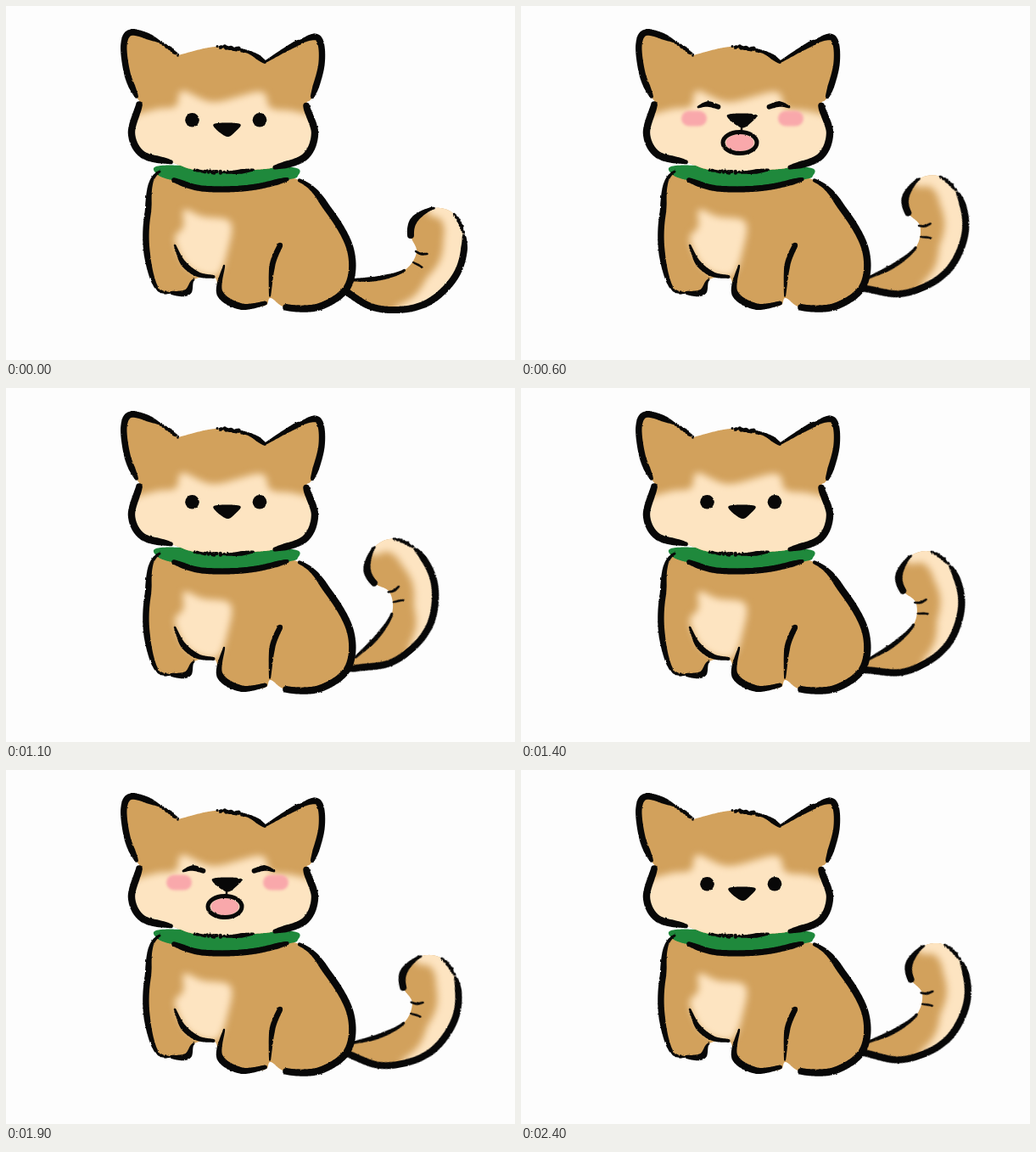
Write an HTML page that moves like this. It is 600 by 417 pixels and loops after 2.5 s.

```html
<!DOCTYPE html>
<html lang="en">
<head>
<meta charset="utf-8">
<title>Wagging dog</title>
<style>
  html, body { margin: 0; width: 100%; height: 100%; overflow: hidden; background: #fdfdfd; }
  svg { display: block; width: 100%; height: 100%; }
</style>
</head>
<body>
<svg id="stage" viewBox="0 0 600 417">
  <defs>
    <filter id="rough" filterUnits="userSpaceOnUse" x="0" y="0" width="600" height="417" color-interpolation-filters="sRGB">
      <feTurbulence type="fractalNoise" baseFrequency="0.3" numOctaves="2" seed="4"/>
      <feDisplacementMap in="SourceGraphic" scale="2" xChannelSelector="R" yChannelSelector="G"/>
    </filter>
    <filter id="soft" filterUnits="userSpaceOnUse" x="0" y="0" width="600" height="417" color-interpolation-filters="sRGB">
      <feGaussianBlur stdDeviation="4"/>
    </filter>
    <filter id="haze" filterUnits="userSpaceOnUse" x="0" y="0" width="600" height="417" color-interpolation-filters="sRGB">
      <feGaussianBlur stdDeviation="1.6"/>
    </filter>
  </defs>
</svg>
<script>
const NS = 'http://www.w3.org/2000/svg';
const stage = document.getElementById('stage');
const INK = '#080808', TAN = '#d2a15c', CREAM = '#fde4c1', GREEN = '#1f893c', PINK = '#f9a8ab';

let seed = 7;
const rand = () => (seed = seed * 16807 % 2147483647) / 2147483647;
const clamp = (v, lo, hi) => Math.max(lo, Math.min(hi, v));

function add(parent, tag, attrs = {}) {
  const el = document.createElementNS(NS, tag);
  for (const key in attrs) el.setAttribute(key, attrs[key]);
  return parent.appendChild(el);
}
const group = (parent, attrs) => add(parent, 'g', attrs);
const inked = parent => group(parent, { filter: 'url(#rough)' });
const ellipse = (parent, cx, cy, rx, ry, attrs) => add(parent, 'ellipse', { cx, cy, rx, ry, ...attrs });
const points = text => text.split(' ').map(p => p.split(',').map(Number));

// Catmull-Rom samples of a contour between two of its points
function sample(pts, from, to, closed) {
  const n = pts.length, out = [];
  const at = i => pts[closed ? (i + n) % n : clamp(i, 0, n - 1)];
  for (let i = from; i < to; i++) {
    const [a, b, c, d] = [at(i - 1), at(i), at(i + 1), at(i + 2)];
    const steps = Math.ceil(Math.hypot(c[0] - b[0], c[1] - b[1]) / 0.8);
    for (let s = 0; s < steps; s++) {
      const t = s / steps;
      out.push([0, 1].map(k => b[k] + 0.5 * t * (c[k] - a[k] +
        t * (2 * a[k] - 5 * b[k] + 4 * c[k] - d[k] + t * (3 * (b[k] - c[k]) + d[k] - a[k])))));
    }
  }
  return out;
}

const outline = pts =>
  'M' + sample(pts, 0, pts.length, true).map(p => p.map(v => v.toFixed(1)).join(' ')).join('L') + 'Z';
const shape = (parent, fill, text) => add(parent, 'path', { d: outline(points(text)), fill });

function disc(x, y, r) {
  const d = (2 * r).toFixed(2);
  return `M${(x - r).toFixed(2)} ${y.toFixed(2)}a${d / 2} ${d / 2} 0 1 0 ${d} 0a${d / 2} ${d / 2} 0 1 0 ${-d} 0`;
}

// Round stamps along a path; both ends taper over `reach` pixels, a dry brush scatters
function stamp(parent, path, width, { start = 0.6, end = 0.6, reach = 14, dry = false, fill = INK } = {}) {
  const last = path.length - 1, span = reach / 0.8;
  const d = path.map(([x, y], i) => {
    const grow = Math.min(1, start + (1 - start) * i / span, end + (1 - end) * (last - i) / span);
    const r = width * grow / 2;
    if (!dry) return disc(x, y, r);
    if (rand() < 0.3) return '';
    return disc(x + (rand() - 0.5) * r * 0.6, y + (rand() - 0.5) * r * 0.8, r * (0.5 + rand() * 0.35));
  }).join('');
  return add(parent, 'path', { d, fill });
}

function brush(parent, text, width, style) {
  const pts = points(text);
  return stamp(parent, sample(pts, 0, pts.length - 1, false), width, style);
}

// A tan contour with a clipped, blurred layer for its light markings and ink for its edge
function part(parent, id, text) {
  const pts = points(text), d = outline(pts);
  add(add(stage.querySelector('defs'), 'clipPath', { id }), 'path', { d });
  add(parent, 'path', { d, fill: TAN });
  const light = group(group(parent, { 'clip-path': `url(#${id})` }), { filter: 'url(#soft)' });
  const ink = inked(parent);
  const edge = (layer, from, to, width, style) => stamp(layer, sample(pts, from, to, true), width, style);
  return { light, ink, edge };
}

function drawTail() {
  const g = group(stage);
  const { light, ink, edge } = part(g, 'tailClip',
    '404,323 438,321 470,311 484,290 477,270 482,251 505,238 528,245 540,272 536,305 520,331 494,351 462,358 430,354 402,337 386,325');
  edge(light, 6, 12, 50, { start: 0.4, end: 0.2, reach: 60, fill: CREAM });
  edge(ink, 0, 2, 5.5, { start: 0.5, reach: 25 });
  edge(ink, 4, 6, 10, { start: 0.8, end: 0.3, reach: 35 });
  edge(ink, 7, 8, 6, { dry: true });
  edge(ink, 8, 15, 8);
  brush(ink, '483,289 489,292 497,292', 4);
  brush(ink, '480,302 486,305 491,308', 3.6);
  return g;
}

function drawBody() {
  const g = group(stage);
  const { light, ink, edge } = part(g, 'bodyClip',
    '181,195 167,245 166,290 177,331 196,338 214,337 222,322 246,320 252,339 277,354 305,353 312,344 330,355 370,354 403,330 406,287 380,240 345,205 262,190');
  shape(light, CREAM, '210,240 232,248 264,254 262,285 248,318 215,308 199,275 209,260');
  shape(g, GREEN, '182,188 179,199 204,207 258,216 330,205 344,200 338,190 262,190');
  g.append(ink);
  edge(ink, 0, 3, 7.5, { start: 0.4, reach: 40 });
  edge(ink, 3, 4, 5, { dry: true });
  edge(ink, 4, 6, 7.5, { end: 0.3 });
  edge(ink, 12, 17, 8.5, { start: 0.9, end: 0.5, reach: 40 });
  brush(ink, '199,282 209,303 226,316 245,319', 6.5, { start: 0.4, reach: 25 });
  brush(ink, '257,306 252,338 277,354 306,350', 8, { start: 0.3, reach: 35 });
  brush(ink, '323,282 314,305 311,342', 7, { start: 0.9, end: 0.3, reach: 35 });
  brush(ink, '198,205 225,214 258,216 295,213 332,204', 7, { start: 0.8 });
}

function drawHead() {
  const { light, ink, edge } = part(group(stage), 'headClip',
    '203,58 181,42 149,31 139,45 143,80 154,107 157,116 148,150 161,175 195,184 222,193 262,196 292,193 317,190 352,178 364,150 354,117 361,107 372,68 368,38 345,43 305,66 305,66 285,54 247,48 203,58');
  shape(light, CREAM,
    '145,136 175,122 200,118 208,100 245,113 300,101 312,120 340,124 368,136 372,178 317,198 262,202 194,194 140,180');
  edge(ink, 0, 1, 6, { dry: true });
  edge(ink, 1, 5, 7.5, { start: 0.4 });
  edge(ink, 6, 9, 8.5, { start: 0.9 });
  edge(ink, 10, 11, 6, { dry: true });
  edge(ink, 11, 12, 5.5);
  edge(ink, 13, 16, 8.5, { end: 0.9 });
  edge(ink, 17, 20, 7.5);
  edge(ink, 20, 21, 6.5, { start: 1, end: 0.4, reach: 40 });
  edge(ink, 22, 23, 6.5);
  edge(ink, 23, 24, 6.5, { dry: true });
}

function nose(parent, x, y, w, h) {
  const low = y + h * 0.6;
  shape(parent, INK,
    `${x - w},${y} ${x},${y - 2} ${x + w},${y} ${x + w * 0.6},${low} ${x + 1},${y + h} ${x - w * 0.6},${low}`);
}

function eyes(parent, mid, text, width, style) {
  brush(parent, text, width, style);
  brush(group(parent, { transform: `translate(${2 * mid}) scale(-1 1)` }), text, width, style);
}

function blush(parent, mid, y, rx, ry, opacity) {
  const tint = group(parent, { filter: 'url(#haze)', opacity });
  for (const x of [mid - 57, mid + 57])
    add(tint, 'rect', { x: x - rx, y: y - ry, width: 2 * rx, height: 2 * ry, rx: ry, fill: PINK });
}

function mouth(parent, ink, x, y, rx, ry) {
  ellipse(parent, x, y, rx - 3.5, ry - 2.5, { fill: PINK });
  ellipse(ink, x, y, rx, ry, { fill: 'none', stroke: INK, 'stroke-width': 5 });
  brush(ink, `${x + 2},${y - ry - 6} ${x + 2},${y - ry}`, 4);
}

function calmFace() {
  const g = group(stage), ink = inked(g);
  for (const x of [219.5, 299]) ellipse(ink, x, 134.3, 8.3, 8.3, { fill: INK });
  nose(ink, 260.5, 139.5, 16, 14.5);
  return g;
}

function halfFace(cheek, opacity) {
  const g = group(stage);
  blush(g, 257, 135, cheek, 5, opacity);
  const ink = inked(g);
  eyes(ink, 261, '213,122 222,120 230,122.5', 11, { start: 0.2, end: 0.9 });
  nose(ink, 261.5, 134, 17.5, 14);
  mouth(g, ink, 260.5, 161.5, 13, 8.5);
  g.append(ink);
  return g;
}

function wideFace() {
  const g = group(stage);
  blush(g, 261, 132.5, 15, 9, 1);
  const ink = inked(g);
  eyes(ink, 262.5, '209,119 220,115.5 233,119', 7, { start: 0.4, end: 0.8 });
  nose(ink, 260.5, 128.5, 17.5, 15);
  mouth(g, ink, 258, 161, 20, 12.5);
  g.append(ink);
  return g;
}

const tail = drawTail();
drawBody();
drawHead();
const faces = [calmFace(), halfFace(5, 0.45), halfFace(8, 0.6), wideFace()];

const STEP = 100, STEPS = 25, PEAK = 45;

// Four wags, the first a step longer; the low point sinks at the ends of the loop
function wag(step) {
  const phase = step < 7 ? step / 7 : (step - 7) % 6 / 6;
  const low = 16 * Math.sin(Math.PI * step / STEPS);
  return low + (PEAK - low) * Math.sin(Math.PI * phase) ** 1.3;
}

// Two yawns per loop, from calm (0) to wide open (3)
const yawn = step =>
  clamp(Math.floor(4 - Math.min(Math.abs(step - 6), Math.abs(step - 18.5))), 0, 3);

let shown = -1;
const start = performance.now();

function draw() {
  const step = Math.floor(Math.max(0, performance.now() - start) / STEP) % STEPS;
  if (step !== shown) {
    shown = step;
    tail.setAttribute('transform', `rotate(${-wag(step)} 400 309)`);
    faces.forEach((face, i) => face.style.display = i === yawn(step) ? '' : 'none');
  }
  requestAnimationFrame(draw);
}
draw();
</script>
</body>
</html>
```
